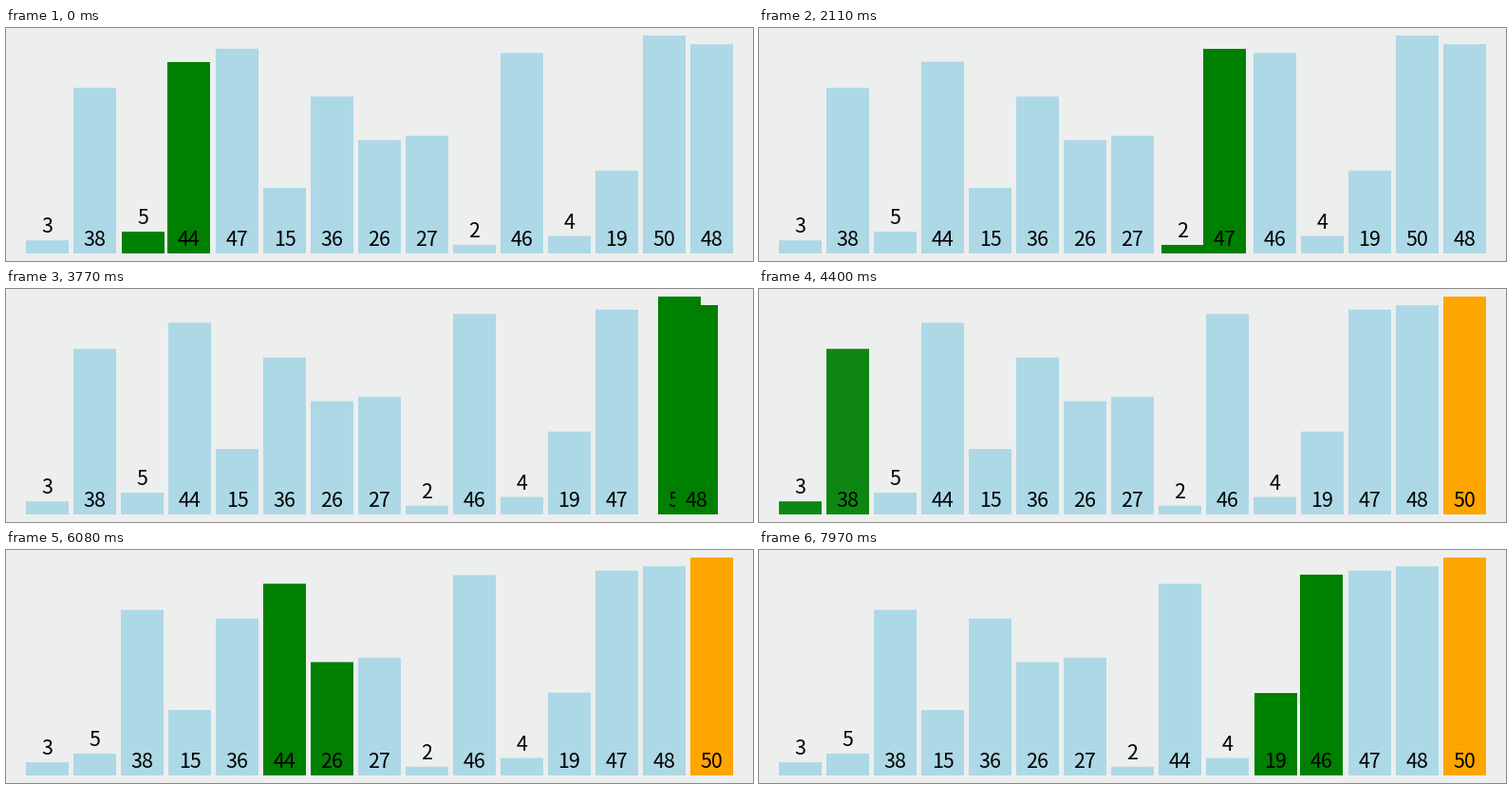
A matplotlib script for the animation above (8 s loop, 787 by 246 pixels).

```python
import numpy as np
import matplotlib.pyplot as plt
from matplotlib.animation import FuncAnimation
from matplotlib.colors import to_rgb
from matplotlib.patches import Rectangle

W, H, DPI = 787, 246, 100
LOOP, STEP = 8000, 20
BASE, UNIT, LEFT, PITCH, BAR = 238, 4.6, 21, 50, 45
VALUES = [3, 44, 38, 5, 47, 15, 36, 26, 27, 2, 46, 4, 19, 50, 48]

PLAIN, ACTIVE, SORTED = (np.array(to_rgb(c)) for c in ("lightblue", "green", "orange"))

# Key points: refresh number, time in ms, progress in sort states
KEYS = [(0, 0, 5.83), (6, 870, 10.43), (15, 2110, 16.76), (27, 3770, 25.43),
        (38, 5170, 32.69), (51, 6970, 41.83), (58, 7970, 46.83)]
KEY_N, KEY_MS, KEY_STATE = zip(*KEYS)
TICKS = np.interp(np.arange(KEY_N[-1] + 1), KEY_N, KEY_MS)


def bubble_states(values):
    """List every (x positions, colours) state of a bubble sort."""
    order = list(range(len(values)))
    done, states = set(), []

    def push(active=()):
        xs = np.empty(len(values))
        for slot, bar in enumerate(order):
            xs[bar] = LEFT + PITCH * slot
        colors = [SORTED if b in done else ACTIVE if b in active else PLAIN
                  for b in range(len(values))]
        states.append((xs, np.array(colors)))

    for end in range(len(values) - 1, 0, -1):
        push()
        for i in range(end):
            a, b = order[i], order[i + 1]
            push((a, b))
            if values[a] > values[b]:
                order[i], order[i + 1] = b, a
                push((a, b))
        done.add(order[end])
        push()
    return states


def ease(t):
    return 4 * t**3 if t < 0.5 else 1 - 4 * (1 - t)**3


def pose(ms):
    """Positions, colours and moving flags at the latest refresh."""
    tick = TICKS[np.searchsorted(TICKS, ms, side="right") - 1]
    k, t = divmod(np.interp(tick, KEY_MS, KEY_STATE), 1)
    (x0, c0), (x1, c1) = STATES[int(k) - 1], STATES[int(k)]
    e = ease(t)
    return x0 + (x1 - x0) * e, c0 + (c1 - c0) * e, x0 != x1


STATES = bubble_states(VALUES)

fig = plt.figure(figsize=(W / DPI, H / DPI), dpi=DPI, facecolor="#edeeee")
ax = fig.add_axes([0, 0, 1, 1])
ax.set(xlim=(0, W), ylim=(H, 0))
ax.axis("off")

bars, labels = [], []
for n, v in enumerate(VALUES):
    top = BASE - UNIT * v
    bar = Rectangle((0, top), BAR, UNIT * v, lw=0, zorder=2 * n)
    bars.append(ax.add_patch(bar))
    baseline = round(top) - 8 if v < 10 else BASE - 8
    labels.append(ax.text(0, baseline, str(v), zorder=2 * n + 1,
                          ha="center", va="baseline", color="black",
                          family="Noto Sans CJK JP", size=21.5 * 72 / DPI))


def draw(i):
    for bar, label, x, color, moving in zip(bars, labels, *pose((i + 0.5) * STEP)):
        bar.set_x(x)
        bar.set_snap(bool(moving))  # moving bars sit on whole pixels
        bar.set_facecolor(np.clip(color, 0, 1))
        label.set_x(x + BAR / 2)
    return bars + labels


anim = FuncAnimation(fig, draw, frames=LOOP // STEP, interval=STEP, repeat=True)
plt.show()
```
